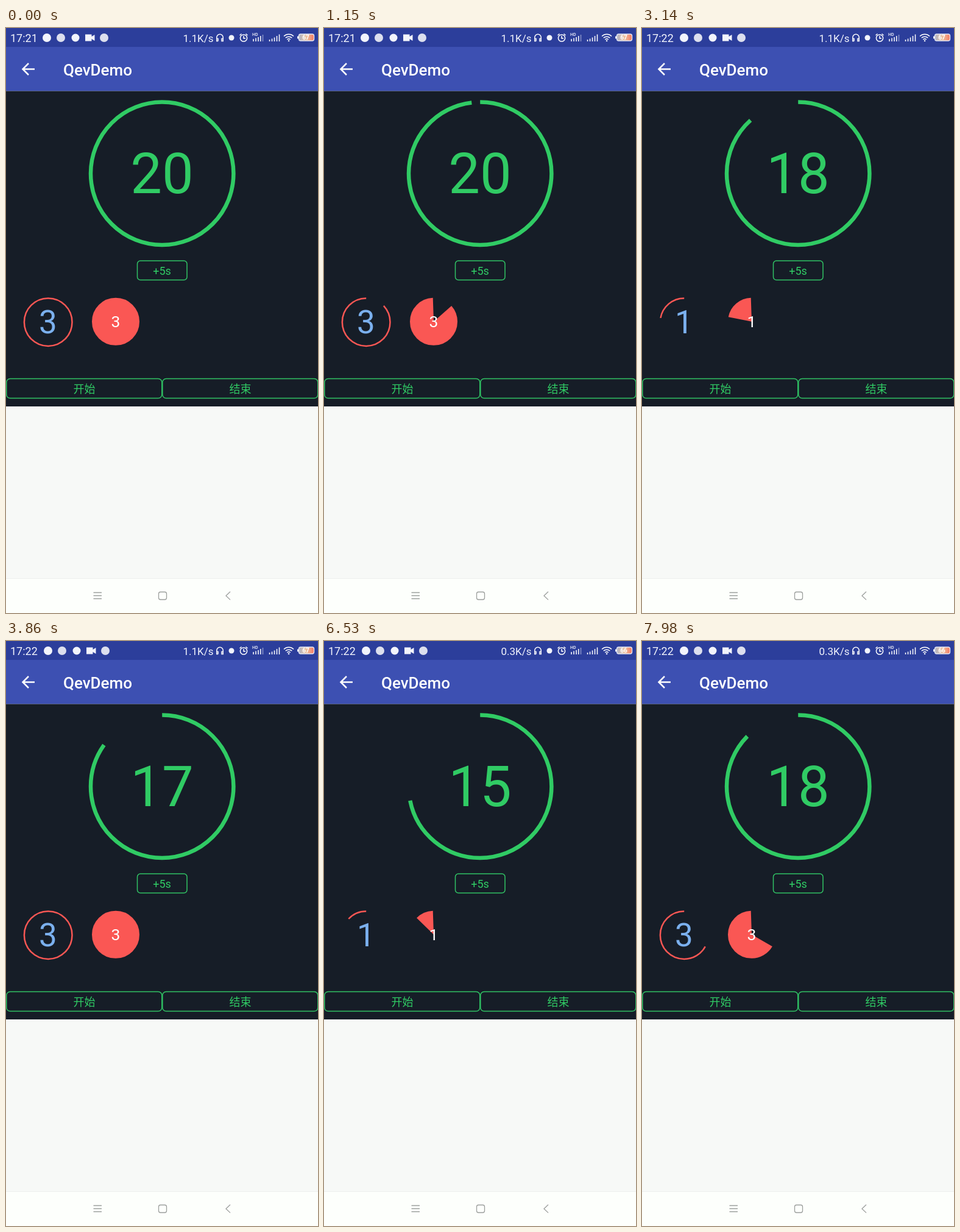
Write an HTML page that moves like this. It is 512 px wide and 960 px high and loops after 8000 ms.

```html
<!DOCTYPE html>
<html lang="zh">
<head>
<meta charset="utf-8">
<title>Countdown</title>
<style>
  html, body { margin: 0; height: 100%; overflow: hidden; }
  svg { display: block; width: 100vw; height: 100vh; font-family: Roboto, sans-serif; }
  .line { fill: none; stroke: #fff; }
  .green { fill: #30cb64; }
  .box { fill: none; stroke: #30c264; stroke-width: 1.5; }
  .nav { fill: none; stroke: #9c9f9d; stroke-width: 1.3; }
  .mid { text-anchor: middle; }
  .cjk { font: 18px "Noto Sans CJK SC", "Noto Sans CJK", sans-serif; }
</style>
</head>
<body>
<svg viewBox="0 0 512 960">
  <defs>
    <linearGradient id="charge">
      <stop offset="0" stop-color="#aeb4c6"/>
      <stop offset=".5" stop-color="#ecc3a0"/>
      <stop offset="1" stop-color="#f57b64"/>
    </linearGradient>
  </defs>

  <rect width="512" height="960" fill="#f7f9f7"/>
  <rect width="512" height="31" fill="#2c3e9b"/>
  <rect y="31" width="512" height="72.5" fill="#3d50b2"/>
  <rect y="103.5" width="512" height="517.5" fill="#161d27"/>
  <rect y="904" width="512" height="56" fill="#fdfffc"/>
  <path d="M0 903.5H512" stroke="#eef0ee"/>

  <!-- status bar -->
  <g fill="#f2f4fc">
    <text id="clock" x="7" y="22.5" font-size="18"></text>
    <g id="notices">
      <circle cx="67" cy="16" r="7"/>
      <circle cx="90" cy="16" r="7" fill="#dcdfee"/>
      <circle cx="114" cy="16" r="6.5"/>
      <path d="M130 10.5h10.5v3.5l5-3v10l-5-3v3.5H130z"/>
      <circle cx="161" cy="16" r="7" fill="#dcdfee"/>
    </g>
    <text id="speed" x="340.5" y="22.5" font-size="17" text-anchor="end"></text>
    <g class="line" stroke-width="1.5">
      <path d="M348 21.5h-2.2v-6a5.2 5.2 0 0 1 10.4 0v6H354v-4h2"/>
      <path d="M346 17.5h2v4"/>
      <circle cx="390" cy="16.5" r="5.6"/>
      <path d="M390 13v4h3M383.5 12l3-2.5M396.500 12l-3-2.500"/>
      <path d="M456 13.500a11.500 11.500 0 0 1 16 0M458.700 16.300a7.600 7.600 0 0 1 10.600 0M461.300 19a4 4 0 0 1 5.400 0"/>
    </g>
    <circle cx="370" cy="16" r="4.500"/>
    <circle cx="464" cy="21" r="1.300"/>
    <text x="404" y="13" font-size="7" font-weight="500">HD</text>
    <path class="line" d="M406 22v-4M410 22v-5.500M414 22v-7M417.700 22v-9" stroke-width="1.500"/>
    <path class="line" d="M421.500 22V11" stroke-width="1.500" opacity=".45"/>
    <path class="line" d="M432.500 22v-3M436.500 22v-4.500M440.500 22v-6.500M444.500 22v-9M448.500 22V10.500" stroke-width="1.500"/>
    <rect x="480.500" y="10" width="25" height="11" rx="3" fill="url(#charge)" stroke="#e4e7f5" stroke-width="1.300"/>
    <path d="M478 13.500h2v4h-2z"/>
    <text id="battery" class="mid" x="492" y="19.300" font-size="10" font-weight="700" fill="#fff"></text>
  </g>

  <!-- toolbar -->
  <path class="line" d="M47 67.500H28M37 58l-9.500 9.500L37 77" stroke-width="2.500"/>
  <text x="94" y="78" font-size="26" font-weight="500" fill="#fff">QevDemo</text>

  <!-- main countdown -->
  <circle id="bigRing" cx="256.200" cy="238.800" r="117.200" pathLength="360" transform="rotate(-90 256.200 238.800)"
          fill="none" stroke="#30cb64" stroke-width="6.500"/>
  <text id="bigText" class="green mid" x="256" y="270.500" font-size="92"></text>
  <rect class="box" x="215.500" y="382" width="81.500" height="31.500" rx="5"/>
  <text class="green mid" x="256" y="405" font-size="18">+5s</text>

  <!-- small countdowns -->
  <circle id="ring" cx="69.200" cy="482.700" r="39.300" pathLength="360" transform="rotate(-90 69.200 482.700)"
          fill="none" stroke="#fa5754" stroke-width="2.500"/>
  <text id="ringText" class="mid" x="69" y="501" font-size="53" fill="#7bb0ee"></text>
  <circle id="pie" cx="180" cy="481.800" r="19.500" pathLength="360" transform="rotate(-90 180 481.800)"
          fill="none" stroke="#fa5754" stroke-width="39"/>
  <text id="pieText" class="mid" x="180" y="491" font-size="26.500" fill="#fff"></text>

  <!-- buttons -->
  <rect class="box" x=".800" y="575.500" width="255" height="32" rx="6"/>
  <rect class="box" x="256.800" y="575.500" width="255" height="32" rx="6"/>
  <text class="green mid cjk" x="128.500" y="599">开始</text>
  <text class="green mid cjk" x="384.500" y="599">结束</text>

  <!-- navigation bar -->
  <path class="nav" d="M143.500 926.500h13.500M143.500 931.500h13.500M143.500 936.500h13.500"/>
  <rect class="nav" x="250.500" y="925.500" width="13" height="12.500" rx="3"/>
  <path class="nav" d="M368 925l-7 6.700 7 6.700"/>
</svg>
<script>
const LOOP = 8;
const BIG = { start: 0.763, rate: 17.57, bonusAt: 7.45, bonusGap: 36 };
const SMALL = { start: 0.72, period: 3.11, hold: 0.03, rate: 117.1 };

const $ = id => document.getElementById(id);
const setText = (id, value) => { $(id).textContent = value; };
const setDash = (id, dash) => $(id).setAttribute('stroke-dasharray', dash);

// Gaps are the elapsed part of each dial, in degrees.
function bigGap(t) {
  return t < BIG.bonusAt
    ? Math.max(0, t - BIG.start) * BIG.rate
    : BIG.bonusGap + (t - BIG.bonusAt) * BIG.rate;
}

function smallGap(t) {
  const phase = Math.max(0, t - SMALL.start) % SMALL.period;
  return Math.min(360, Math.max(0, phase - SMALL.hold) * SMALL.rate);
}

function draw(t) {
  const big = bigGap(t);
  setDash('bigRing', big ? `${360 - big} 360` : 'none');
  setText('bigText', Math.ceil(20 - big / 18));

  const small = smallGap(t);
  const full = small < 0.5;
  setDash('ring', full ? 'none' : `0 ${small} ${360 - small} 0`);
  setDash('pie', full ? 'none' : `0 ${small + 1.5} ${Math.max(0, 356.5 - small)} 360`);
  const left = Math.max(1, Math.ceil(3 - small / 120));
  setText('ringText', left);
  setText('pieText', left);

  const nextMinute = t >= 3;
  setText('clock', nextMinute ? '17:22' : '17:21');
  $('notices').setAttribute('transform', `translate(${nextMinute ? 2 : 0} 0)`);
  setText('speed', t < 4.2 ? '1.1K/s' : '0.3K/s');
  setText('battery', t < 6.2 ? 67 : 66);
}

function tick() {
  draw(performance.now() / 1000 % LOOP);
  requestAnimationFrame(tick);
}
tick();
</script>
</body>
</html>
```
